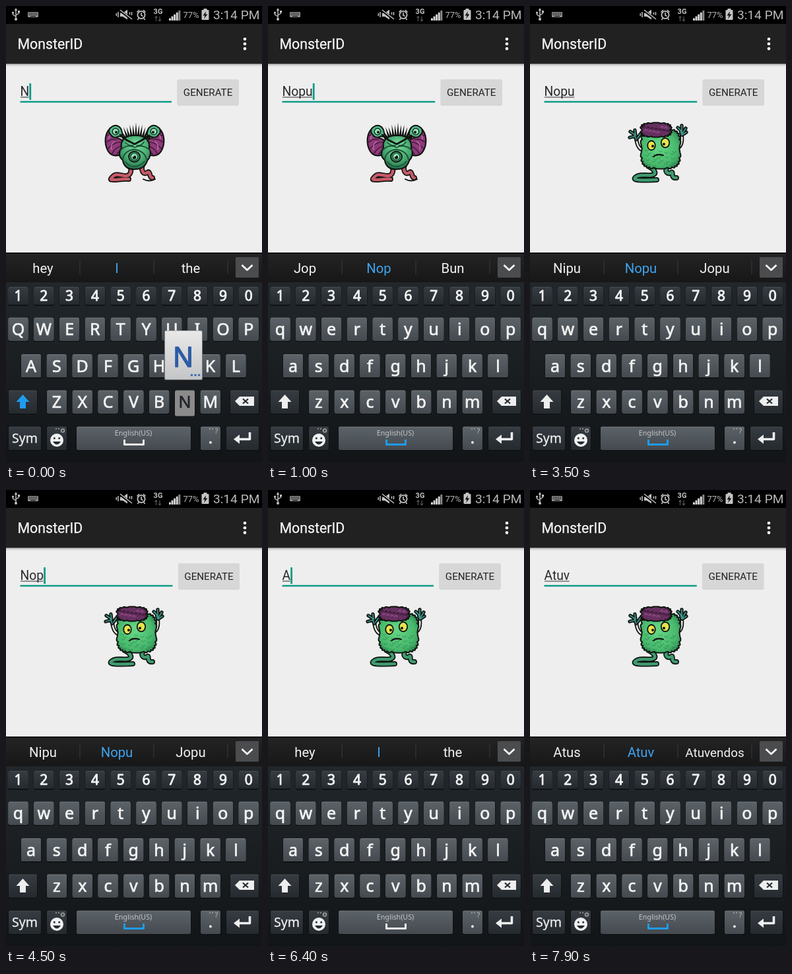
Recreate the animation shown at these times as an HTML page with a canvas. Size 388 by 690 pixels, loop 8 s.

```html
<!DOCTYPE html>
<html lang="en">
<head>
<meta charset="utf-8">
<title>MonsterID</title>
<style>
html, body { margin: 0; width: 100%; height: 100%; overflow: hidden; background: #000; }
canvas { display: block; width: 100%; height: 100%; }
</style>
</head>
<body>
<canvas id="stage"></canvas>
<script>
const W = 388, H = 690, LOOP = 8000;
const canvas = document.getElementById('stage');
const g = canvas.getContext('2d');
const dpr = Math.max(1, window.devicePixelRatio || 1);
canvas.width = W * dpr;
canvas.height = H * dpr;

const UI = 'Roboto, sans-serif', KEYS = '"Noto Sans", "Open Sans", sans-serif';
const BLUE = '#1f9bf0', TEAL = '#0d9c87', INK = '#101410';

// Timelines: [start, value]
const typed = [[0, 'N'], [400, 'No'], [700, 'Nop'], [900, 'Nopu'], [4400, 'Nop'], [4700, 'No'],
  [4900, 'N'], [5100, ''], [6200, 'A'], [6800, 'At'], [7100, 'Atu'], [7400, 'Atuv']];
const hints = [[0, 'hey I the'], [500, 'Mo No Not'], [800, 'Jop Nop Bun'], [1100, 'Nipu Nopu Jopu'],
  [4600, 'Jop Nop Bun'], [4800, 'Mo No Not'], [5000, 'hey I the'], [6500, 'S A As'],
  [6900, 'Ay At Art'], [7200, 'Stu Atu Ati'], [7500, 'Atus Atuv Atuvendos']];
// Key presses: [start, end, key]
const presses = [[0, 200, 'n'], [350, 500, 'o'], [650, 800, 'p'], [850, 980, 'u'],
  [4350, 4450, 'del'], [4650, 4750, 'del'], [4850, 4950, 'del'], [5050, 5150, 'del'],
  [5600, 5700, 'shift'], [6150, 6330, 'a'], [6750, 6900, 't'], [7050, 7200, 'u'], [7350, 7500, 'v']];
const GENERATE = [2550, 2800];

const at = (line, t) => line.filter(s => s[0] <= t).pop();

function box(x, y, w, h, r, fill) {
  g.fillStyle = fill;
  g.beginPath();
  g.roundRect(x, y, w, h, r);
  g.fill();
}
function fade(y0, y1, a, b) {
  const f = g.createLinearGradient(0, y0, 0, y1);
  f.addColorStop(0, a);
  f.addColorStop(1, b);
  return f;
}
function text(s, x, y, font, color, align = 'center', bold = 0) {
  g.font = font;
  g.fillStyle = g.strokeStyle = color;
  g.textAlign = align;
  g.fillText(s, x, y);
  if (bold) {
    g.lineWidth = bold;
    g.strokeText(s, x, y);
  }
}
function path(d, fill, stroke, lw = 1.5) {
  const p = new Path2D(d);
  if (fill) { g.fillStyle = fill; g.fill(p); }
  if (stroke) { g.strokeStyle = stroke; g.lineWidth = lw; g.stroke(p); }
}
function dot(x, y, r, fill, stroke, lw = 1.5, ry = r) {
  g.beginPath();
  g.ellipse(x, y, r, ry, 0, 0, 7);
  if (fill) { g.fillStyle = fill; g.fill(); }
  if (stroke) { g.strokeStyle = stroke; g.lineWidth = lw; g.stroke(); }
}
function limb(d, color, w) {
  path(d, null, INK, w + 3.5);
  path(d, null, color, w);
}

function statusBar() {
  const c = '#c4c4c4';
  box(0, 0, W, 27, 0, '#000');
  path('M15 5V20M15 16L10.5 13V10M15 14L19.5 11V9', null, c, 1.4);
  path('M15 3L12.8 7H17.2Z', c);
  dot(15, 20, 2, c);
  dot(10.5, 10, 1.6, c);
  box(18, 7, 3, 3, 0, c);
  box(33, 9, 16, 8, 1, '#8f8f8f');
  for (let i = 0; i < 10; i++) box(34.5 + i % 5 * 2.8, 10.3 + (i > 4) * 2.3, 1.6, 1.2, 0, '#000');
  box(37, 15, 8, 1, 0, '#000');
  path('M173 10.5H177L184 5.5V20.5L177 16H173Z', c);
  path('M172 6L190 20', null, '#000', 3.5);
  path('M173 6L191 20M170 9V17M167.3 11V15M187.5 9.5V13M190.5 9V14', null, c, 1.5);
  dot(205, 13.5, 5.6, null, c, 1.8);
  path('M205 10V14L207.5 15.5M198.5 9.5L202 6M211.5 9.5L208 6M201 18.5L199.5 21M209 18.5L210.5 21', null, c, 1.6);
  text('3G', 230.5, 12, '700 11px ' + UI, c);
  path('M227.5 23V16M225.5 18L227.5 15.5L229.5 18M233 15.5V22.5M231 20.5L233 23L235 20.5', null, '#555', 1.2);
  for (let i = 0; i < 5; i++) {
    const h = 3.5 + i * 2.9;
    box(247 + i * 3.6, 22 - h, 2.9, h, 0, i < 4 ? '#d8d8d8' : '#8a8a8a');
  }
  text('77%', 280.5, 18, '13px ' + UI, '#b8b8b8');
  box(299.5, 4, 5, 3, 0, c);
  box(296.5, 6, 11, 15, 1, c);
  path('M303 8L298.5 14.5H301.5L300 19.5L305.5 12.5H302.3Z', '#111');
  text('3:14 PM', 384.5, 20, '19.2px ' + UI, '#b9b9b9', 'right');
}

function appBar() {
  box(0, 27, W, 61, 0, '#212121');
  text('MonsterID', 17.5, 65, '21.3px ' + UI, '#f8f8f8', 'left', 0.25);
  for (const y of [50, 57.3, 64.6]) dot(362, y, 2.3, '#fff');
  box(0, 87.5, W, 5, 0, fade(87, 92, '#b4b4b4', '#eeeeee'));
}

function form(t) {
  const [since, word] = at(typed, t);
  const font = '19.3px ' + UI;
  g.font = font;
  const w = g.measureText(word).width, shift = w * 0.065;
  text(word, 21.5, 136, font, '#2a2a2a', 'left');
  if (word) box(22, 137.4, w - 1, 1.1, 0, '#333');
  box(21.5, 143.8, 228.7 + shift, 2.4, 0, TEAL);
  if ((t - since) % 1000 < 500) box(21.6 + w, 117, 2.8, 25, 0, TEAL);

  const x = 258.7 + shift, down = t >= GENERATE[0] && t < GENERATE[1];
  box(x, 111.5, 93, 39, 2, '#c9c9c9');
  box(x, 111, 93, 38.8, 2, down ? '#bdbdbd' : '#d7d7d7');
  text('GENERATE', x + 46.5, 136, '15.2px ' + UI, '#222');
}

function clawMonster() {
  limb('M188 240C191 249 189 257 182 257S167 253 163 257S156 263 163 263S177 261 186 262', '#c65a68', 4.5);
  limb('M207 240C204 250 209 256 214 252S217 261 222 260', '#c65a68', 4.5);
  path('M208 262Q217 267 226 262', null, INK, 2);
  for (let i = 0; i < 13; i++) {
    const k = i - 6, x = 197 + k * 3.1, tip = 176 + Math.abs(k) * 1.7 + i % 2 * 2;
    path(`M${x - 2.2} 201L${x + k * 1.7} ${tip}L${x + 2.2} 201Z`, INK);
  }
  for (const s of [-1, 1]) {
    g.save();
    g.translate(195, 0);
    g.scale(s, 1);
    path('M15 222C24 227 34 229 40 220C47 208 45 193 38 186C33 181 27 182 25 187C29 191 30 197 26 200C20 201 15 206 14 213Z', '#8e3a78', INK, 2.2);
    path('M30 196Q37 193 43 197M28 202Q36 200 44 207M22 206Q31 206 41 216M18 212Q28 212 34 223M17 219Q22 217 27 224', null, '#471a43', 1.7);
    path('M33 189Q39 194 39 201M31 205Q37 210 35 217', null, '#bd6ba5', 1.6);
    path('M19 192C20 182 28 178 35 183C40 186 40 192 36 195C34 199 27 200 24 197C21 199 18 196 19 192Z', '#56b98a', INK, 2);
    dot(29, 190, 4.8, '#8fe3b6', INK, 1.3);
    dot(28, 191, 2, INK);
    g.restore();
  }
  const skin = g.createRadialGradient(197, 209, 3, 196, 219, 30);
  skin.addColorStop(0, '#72d797');
  skin.addColorStop(0.6, '#47a970');
  skin.addColorStop(1, '#1e6643');
  path('M175 215C172 201 184 195 196 196C210 195 219 203 217 216C221 222 218 230 214 234C211 245 203 247 195 247C186 248 178 243 177 233C170 228 171 220 175 215Z', skin, INK, 2.2);
  path('M174 218Q183 208 195 214Q207 208 218 218M177 232Q179 219 194 217Q210 219 213 232M181 236Q187 243 195 243Q204 242 210 235', null, '#1d5137', 1.8);
  path('M173 195L183 203L195 209L206 203L217 196', null, INK, 2.8);
  path('M181 207Q187 212 193 211M198 211Q205 212 209 206', null, '#1b4d33', 1.6);
  dot(194.5, 228, 8.5, '#3c9666', INK, 1.8, 8);
  dot(194.5, 228, 5.4, '#8ce0b0', '#174b32', 1.4);
  dot(194.5, 229, 2.7, INK);
  dot(193, 227, 1, '#dfffee');
}

// Closed outline with a scalloped edge on a superellipse
function fuzzy(cx, cy, rx, ry, power, bumps, depth, fill) {
  const n = 180;
  g.beginPath();
  for (let i = 0; i < n; i++) {
    const a = i / n * Math.PI * 2, c = Math.cos(a), s = Math.sin(a);
    const k = 1 - depth + depth * Math.abs(Math.sin(a * bumps / 2));
    g.lineTo(cx + rx * k * Math.sign(c) * Math.abs(c) ** power, cy + ry * k * Math.sign(s) * Math.abs(s) ** power);
  }
  g.closePath();
  g.fillStyle = fill;
  g.fill();
  g.strokeStyle = INK;
  g.lineWidth = 2;
  g.stroke();
}

function furMonster() {
  limb('M180 243C190 248 193 255 184 256S166 254 160 259S168 264 192 263', '#3f9a70', 4.5);
  limb('M208 243C203 252 210 255 214 252S212 261 222 260', '#3f9a70', 4.5);
  limb('M172 218C164 217 162 208 161 201', '#e8ece6', 2.4);
  limb('M224 215C231 211 231 203 230 195', '#e8ece6', 2.4);
  const hands = ['M161 202L158 194L152 190M159 197L151 199M160 196L159 188M163 200L167 194',
    'M230 195L228 188L224 184M230 193L230 181M231 193L236 185M231 195L237 191'];
  for (const d of hands) limb(d, '#3f958a', 1.8);
  const fur = g.createRadialGradient(194, 211, 5, 197, 217, 38);
  fur.addColorStop(0, '#62d383');
  fur.addColorStop(0.65, '#48b86c');
  fur.addColorStop(1, '#2a8450');
  fuzzy(198, 216, 30.5, 30.5, 0.5, 26, 0.07, fur);
  for (let i = 0; i < 24; i++) {
    const x = 174 + i * 19 % 47, y = 218 + i * 11 % 24;
    path(`M${x} ${y}q2.5 3.5 5 0`, null, 'rgba(22,105,58,.45)', 1.2);
  }
  fuzzy(191, 187.5, 24, 11, 0.6, 18, 0.12, '#65305f');
  for (let i = 0; i < 13; i++) {
    const x = 171 + i * 3, y = 184 + i * 5 % 9;
    path(`M${x} ${y}q2 -4 4 0`, null, i % 2 ? '#964f8c' : '#36152f', 1.3);
  }
  dot(184, 211, 5.8, '#e5e34e', INK, 1.8, 7);
  dot(205, 207, 6.2, '#e5e34e', INK, 1.8, 7.2);
  dot(186, 212, 2, INK);
  dot(203, 209, 2, INK);
  path('M187 228Q193 223 202 226', null, INK, 2);
}

function hintBar(t) {
  box(0, 373, W, 46, 0, fade(373, 418, '#242424', '#171717'));
  box(0, 373, W, 1.5, 0, '#0b0b0b');
  at(hints, t)[1].split(' ').forEach((s, i) => {
    const size = s.length > 6 ? 18.9 : 20.3;
    text(s, 56 + i * 112, 404, size + 'px ' + UI, i === 1 ? '#3fa3ef' : '#f2f2f2');
    box(111.5 + i * 112, 385, 1, 21, 0, '#3a3a3a');
  });
  box(348, 380, 35, 31, 1.5, '#4a4c4e');
  path('M357.5 392L365.5 399.5L373.5 392', null, '#fff', 2.6);
}

function key(cx, y, w, h, dark, down) {
  const x = cx - w / 2;
  box(x - 0.5, y, w + 1, h + 1.5, 3, '#0a0c0e');
  if (down) return box(x, y, w, h + 4, 2.5, '#8b8b8b');
  box(x, y, w, h, 2.5, dark ? '#454b51' : '#737a80');
  box(x, y + 1, w, h - 1, 2.5, dark ? fade(y, y + h, '#363c42', '#242a2e') : fade(y, y + h, '#5c6368', '#444a4f'));
}

const letters = {};
['qwertyuiop', 'asdfghjkl', 'zxcvbnm'].forEach((row, r) => {
  [...row].forEach((ch, i) => {
    letters[ch] = { x: [18.5, 38, 77][r] + i * 38.8, y: [471.5, 527, 581.5][r] };
  });
});

function keyboard(t) {
  const hit = presses.find(p => t >= p[0] && t < p[1]);
  const held = hit ? hit[2] : '';
  const upper = t < 300 || (t >= 5700 && t < 6350);
  const cased = ch => upper ? ch.toUpperCase() : ch;
  box(0, 418, W, H - 418, 0, fade(418, H, '#22272b', '#121517'));

  for (let i = 0; i < 10; i++) {
    const x = 18.5 + i * 38.8;
    key(x, 425, 30, 27, true);
    text((i + 1) % 10, x, 446, '21px ' + KEYS, '#f4f4f4', 'center', 0.9);
  }
  for (const ch in letters) {
    const k = letters[ch];
    key(k.x, k.y, 30, 35, false, held === ch);
    text(cased(ch), k.x, k.y + 26.5, '25px ' + KEYS, held === ch ? '#20242a' : '#f4f4f4', 'center', 0.7);
  }

  key(25.5, 581.5, 43, 35, true, held === 'shift');
  path('M25.5 588L35.5 599H30V609H21V599H15.5Z', upper ? BLUE : '#eee');
  key(361.5, 581.5, 43, 35, true, held === 'del');
  path('M347 598L354 591H376V605H354Z', '#eee');
  path('M359 594.5L367 601.5M367 594.5L359 601.5', null, '#252b31', 2.2);

  key(28.5, 636.5, 49, 35, true);
  text('Sym', 28.5, 661, '19.5px ' + KEYS, '#eee', 'center', 0.3);
  key(77, 636.5, 30, 35, true);
  dot(77, 657, 10, '#f0f0f0');
  dot(73.3, 654, 1.5, '#252b31');
  dot(80.7, 654, 1.5, '#252b31');
  path('M71 659Q77 668 83 659Z', '#252b31');
  key(310, 636.5, 30, 35, false);
  for (const x of [76, 80, 309, 313]) dot(x, 639.7, 1, '#aaa');
  dot(86, 642.5, 2.4, null, '#999', 1.8);

  const idle = at(hints, t)[1].startsWith('hey');
  key(193.5, 636.5, 173, 35, false);
  text('English(US)', 193, 650, '10.7px ' + KEYS, '#c3c6c9');
  path('M179.5 656V663.5H208.5V656', null, idle ? '#eee' : BLUE, 3);
  text('.', 310, 662, '24px ' + KEYS, '#f4f4f4', 'center', 0.7);
  text('?', 319, 647, '11px ' + KEYS, '#bbb');
  key(358.5, 636.5, 49, 35, true);
  path('M369.5 645V655.5H352', null, '#eee', 3.6);
  path('M345 655.5L354 648.5V662.5Z', '#eee');

  const k = letters[held];
  if (!k) return;
  const x = Math.min(Math.max(k.x - 30, 2), W - 59), y = k.y - 90;
  box(x - 1, y - 0.5, 58, 75, 2, '#777');
  box(x, y, 56, 73.5, 2, fade(y, y + 74, '#e9e9e9', '#c4c5c6'));
  text(cased(held), x + 27.5, y + 54.5, '41px ' + KEYS, '#2d5da6', 'center', 1.5);
  for (let i = 0; i < 3; i++) dot(x + 40.5 + i * 5.5, y + 67, 1.8, '#3c6db4');
}

function draw(now) {
  const t = now % LOOP;
  g.setTransform(dpr, 0, 0, dpr, 0, 0);
  g.lineJoin = 'round';
  box(0, 0, W, H, 0, '#eeeeee');
  statusBar();
  appBar();
  form(t);
  g.lineCap = 'round';
  if (t >= GENERATE[1]) furMonster();
  else clawMonster();
  g.lineCap = 'butt';
  hintBar(t);
  keyboard(t);
}

const start = performance.now();
function tick() {
  draw(performance.now() - start);
  requestAnimationFrame(tick);
}
tick();
</script>
</body>
</html>
```
